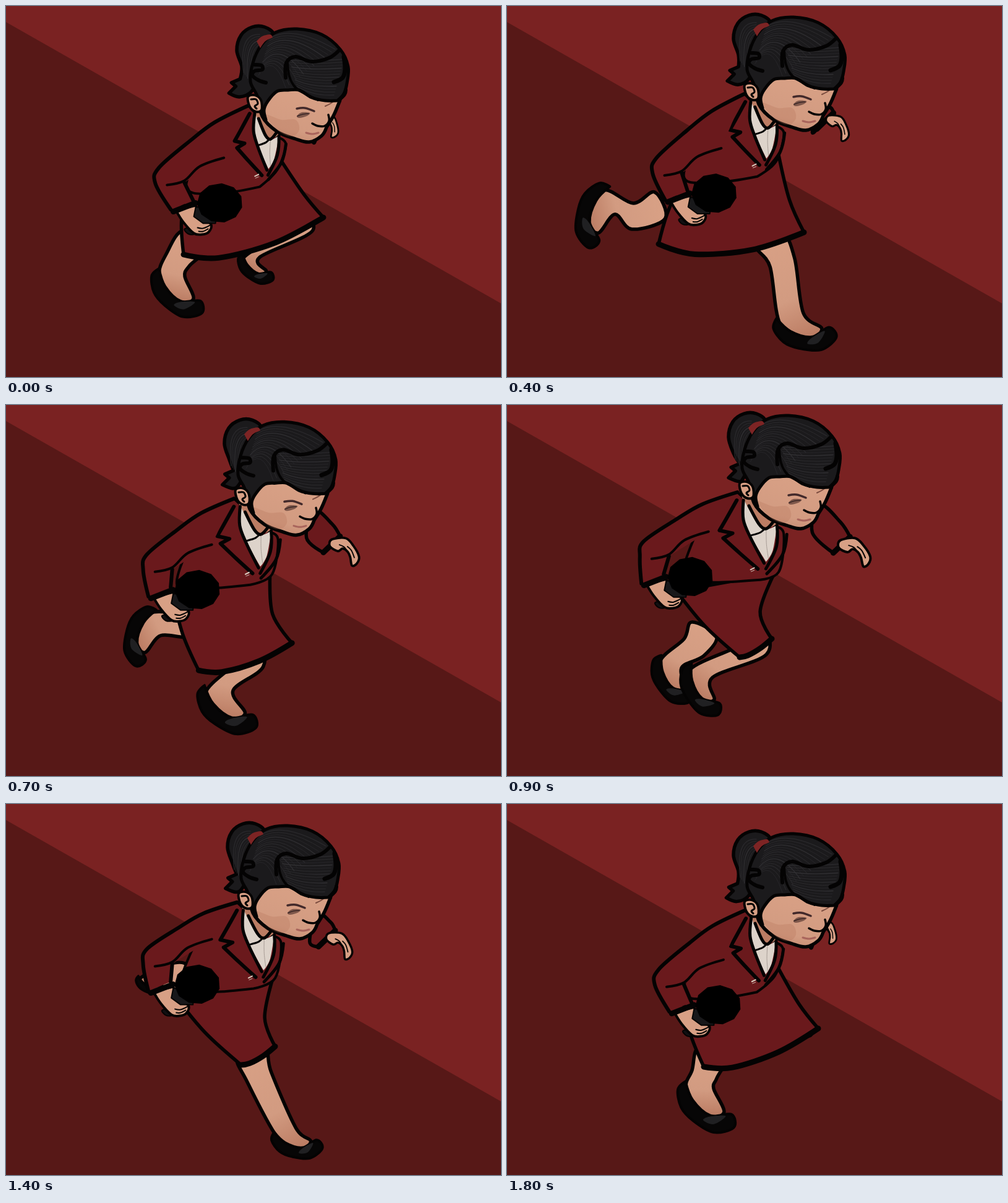
An HTML page with a canvas that plays this animation: 800x600 px, repeating every 1900 ms.

```html
<!DOCTYPE html>
<html lang="en">
<head>
<meta charset="utf-8">
<title>Running reporter</title>
<style>
html, body { margin: 0; width: 100%; height: 100%; overflow: hidden; background: #571817; }
canvas { display: block; width: 800px; height: 600px; }
</style>
</head>
<body>
<canvas id="stage" width="800" height="600"></canvas>
<script>
const ctx = document.getElementById('stage').getContext('2d');
const STEP = 100, COUNT = 19;
const INK = '#040303', CLOTH = '#6a191c', SKIN = '#d8a085', SHADE = '#bb7c63', HAIR = '#1b1a1c';

const pts = s => {
  const n = s.match(/-?[\d.]+/g).map(Number);
  return Array.from({ length: n.length / 2 }, (_, i) => [n[2 * i], n[2 * i + 1]]);
};
const add = ([x, y], dx, dy) => [x + dx, y + dy];
const mix = (a, b, u) => a.map((v, i) => v + (b[i] - v) * u);
const unit = (a, b) => {
  const x = b[0] - a[0], y = b[1] - a[1], l = Math.hypot(x, y) || 1;
  return [x / l, y / l];
};
// One swing per loop, highest at the given step.
const wave = (f, peak) => Math.cos(2 * Math.PI * (f - peak) / COUNT);

// Key joints of the run; everything else hangs on them.
const TIMES = [0, 4, 6, 9, 11, 14, 18];
const joints = {
  body: pts('0,0 -7,-19 -20,-7 -15,-20 -6,-25 -15,-2 -7,11'),
  hemL: pts('287,402 245,385 279,432 376,408 380,402 380,422 318,425'),
  hemR: pts('513,342 480,366 478,385 428,378 437,370 435,392 503,363'),
  nearKnee: pts('278,410 203,340 233,340 400,395 404,425 409,441 319,437'),
  nearHeel: pts('240,435 153,290 205,293 289,425 385,510 432,541 281,460'),
  nearToe: pts('320,492 138,392 163,393 345,498 460,540 512,552 370,518'),
  farKnee: pts('475,362 445,415 435,425 302,392 262,350 262,280 470,370'),
  farHeel: pts('378,408 434,518 354,488 241,412 204,340 212,284 370,385'),
  farToe: pts('433,440 533,530 462,530 297,478 265,428 255,298 410,395')
};

// Periodic cubic interpolation between key positions.
function joint(name, f) {
  const n = TIMES.length, p = joints[name];
  const key = i => {
    const lap = Math.floor(i / n);
    return { t: TIMES[i - lap * n] + lap * COUNT, p: p[i - lap * n] };
  };
  const i = TIMES.findLastIndex(t => t <= f);
  const [a, b, c, d] = [-1, 0, 1, 2].map(o => key(i + o));
  const h = c.t - b.t, u = (f - b.t) / h, v = 1 - u;
  return b.p.map((y0, k) => {
    const y1 = c.p[k];
    const m0 = (y1 - a.p[k]) / (c.t - a.t), m1 = (d.p[k] - y0) / (d.t - b.t);
    return y0 * (1 + 2 * u) * v * v + y1 * u * u * (3 - 2 * u) + h * u * v * (m0 * v - m1 * u);
  });
}

function buildPose(f) {
  const body = joint('body', f);
  const swing = wave(f, 1), twist = (1 - swing) / 2;
  const collar = add(body, 403 - 5 * twist, 174);
  const button = add(collar, 9 + 12 * twist, 97 + 12 * twist);
  return {
    f, body, twist, collar, button,
    collarR: add(collar, 37 + 16 * twist, 37 + 5 * twist),
    pelvis: add(button, -40, 20),
    mic: [320 + 27 * swing, body[1] + 307 + 17 * wave(f, 2.5)],
    reach: wave(f, 9.7)
  };
}

// Smooth curve through the points; corners get no tangent.
function curve(p, closed, corners = []) {
  const n = p.length;
  const tan = i => {
    if (corners.includes(i) || (!closed && (i === 0 || i === n - 1))) return [0, 0];
    const a = p[(i + n - 1) % n], b = p[(i + 1) % n];
    return [(b[0] - a[0]) / 6, (b[1] - a[1]) / 6];
  };
  ctx.beginPath();
  ctx.moveTo(...p[0]);
  for (let i = 0; i < (closed ? n : n - 1); i++) {
    const j = (i + 1) % n, s = tan(i), e = tan(j);
    ctx.bezierCurveTo(p[i][0] + s[0], p[i][1] + s[1], p[j][0] - e[0], p[j][1] - e[1], ...p[j]);
  }
}
function ink(width, color = INK) {
  ctx.lineWidth = width;
  ctx.strokeStyle = color;
  ctx.stroke();
}
function shape(p, fill, width = 5.5, corners) {
  curve(p, true, corners);
  ctx.fillStyle = fill;
  ctx.fill();
  if (width) ink(width);
}
function line(p, width = 4, color, corners) {
  curve(p, false, corners);
  ink(width, color);
}
function fade(a, b) {
  const g = ctx.createLinearGradient(...a, ...b);
  g.addColorStop(0, SKIN);
  g.addColorStop(0.6, '#d29b81');
  g.addColorStop(1, SHADE);
  return g;
}

function drawBackground() {
  ctx.fillStyle = '#7a2222';
  ctx.fillRect(0, 0, 800, 600);
  ctx.fillStyle = '#571817';
  ctx.beginPath();
  pts('0,26 800,481 800,600 0,600').forEach(p => ctx.lineTo(...p));
  ctx.fill();
}

function drawFarArm({ body, collarR, reach }) {
  const hand = add(body, 551 + 27 * reach, 222 + 32 * reach);
  const top = add(collarR, 70, -35), cuffT = add(hand, -8, -20), cuffB = add(hand, -35, 6);
  shape([top, add(mix(top, cuffT, 0.6), 4, -3), cuffT, cuffB, add(collarR, 58, 10)], CLOTH, 5.5, [2, 3]);
  line([cuffT, cuffB], 9);

  ctx.save();
  ctx.translate(...hand);
  ctx.rotate(0.2 * (1 - reach));
  ctx.scale(0.85 + 0.15 * reach, 0.85 + 0.15 * reach);
  shape(pts('-24,-14 0,-18 14,-6 25,12 22,24 14,28 10,14 5,5 -4,0 -12,5 -26,-2'), SKIN, 4);
  line(pts('4,-4 11,2 17,14'), 2);
  line(pts('-10,-6 -2,-3 5,5'), 2);
  ctx.restore();
}

function drawLeg(side, { f, pelvis }) {
  const [knee, heel, toe] = ['Knee', 'Heel', 'Toe'].map(j => joint(side + j, f));
  const [fx, fy] = [toe[0] - heel[0], toe[1] - heel[1]];
  const foot = ([u, v]) => add(heel, u * fx - v * fy, u * fy + v * fx);
  const hip = mix(knee, pelvis, 0.27), ankle = foot([0.25, -0.1]);
  const [a, b] = [unit(hip, knee), unit(knee, ankle)];
  const bend = unit([0, 0], add(a, ...b));
  const across = (p, d, w) => add(p, d[1] * w, -d[0] * w);

  shape([
    across(hip, a, 23), across(knee, bend, 21),
    ...pts('.42,-.27 .75,-.05 .52,.16 .07,-.04').map(foot),
    across(knee, bend, -21), across(hip, a, -23)
  ], fade(hip, foot([0.6, 0.1])));
  shape(pts('0,-.13 -.03,.04 .16,.24 .42,.31 .78,.29 1,.06 .86,-.09 .6,.1 .25,.05').map(foot), '#070606', 4, [0]);
  shape(pts('.8,-.02 .6,.12 .55,.22 .72,.18').map(foot), '#202022', 0);
}

function drawSkirt({ f, button, twist }) {
  const l = joint('hemL', f), r = joint('hemR', f);
  const wl = add(button, -122 - 8 * twist, 22 + 18 * twist);
  const wr = add(button, 34 - 6 * twist, -20 + 32 * twist);
  const sag = 0.09 * (r[0] - l[0]);
  const hem = [l, add(mix(l, r, 0.25), 0, sag), add(mix(l, r, 0.65), 0, sag), r];
  shape([wl, add(mix(wl, l, 0.5), -5, 3), ...hem, add(mix(wr, r, 0.55), -22 * twist, 4), wr],
    CLOTH, 5.5, [0, 2, 5, 7]);
  line(hem, 9);
}

function drawTorso({ collar, collarR, button, twist }) {
  shape([
    add(collar, -11, -13), add(collar, -60, 20), add(button, -121, 19), add(button, -70, 32 - 8 * twist),
    add(button, -2, 21), add(button, 26 + 10 * twist, -7 + 16 * twist), add(collarR, 12, 13), add(collarR, -2, 1)
  ], CLOTH, 4, [0, 4, 7]);

  // Shirt and lapels: down follows the button, across follows the right collar.
  const [ux, uy] = [(collarR[0] - collar[0]) / 37, (collarR[1] - collar[1]) / 37];
  const [vx, vy] = [(button[0] - collar[0]) / 97, (button[1] - collar[1]) / 97];
  const fit = s => pts(s).map(([x, y]) => {
    const d = (y - x) * 97 / 88;
    return add(collar, x * ux + d * vx * 0.92, x * uy + d * vy * 0.92);
  });
  shape(fit('-2,-6 10,34 20,40 37,34 36,14 16,2'), SHADE, 0);
  shape(fit('0,0 -5,26 0,52 14,88 26,72 38,36 21,42 11,31'), '#ddd3ca', 0, [0, 3, 5]);
  line(fit('5,8 14,34 22,41 33,32'), 5);
  line(fit('1,50 14,46 21,40'), 3);
  line(fit('22,44 19,63 18,83'), 1, '#a79c95');
  line(fit('-1,0 -6,28 -1,53 11,90'), 5);
  line(fit('38,36 32,66 12,98'), 5);
  line(fit('-10,0 -30,28 -41,43 -24,47 -38,54 -19,76 1,98'), 6, INK, [2, 3, 4]);
  line(fit('49,49 38,78 12,105'), 5);
  line([add(button, -10, 4), add(button, -4, 1)], 2, '#d8c9bd');
  line([add(button, -9, 7), add(button, -4, 5)], 1, '#d8c9bd');
}

function drawNearArm({ collar, mic, twist }) {
  const neck = add(collar, -11, -13);
  const elbow = add(mic, -105 + 25 * twist, -41);
  const crook = add(elbow, 47, 8), pit = add(elbow, 111, -32);
  const cuff = [add(mic, -79, 11), add(mic, -43, -4)];
  const outer = [neck, add(mix(neck, elbow, 0.36), 0, -15), add(mix(neck, elbow, 0.62), 0, -16),
    add(elbow, 6, -16), add(elbow, 0, 9), cuff[0]];
  shape([...outer, cuff[1], crook, pit], CLOTH, 0, [0, 5, 6, 7, 8]);
  line(outer, 6);
  line([pit, add(mix(pit, crook, 0.55), -4, -8), add(crook, 0, -3), add(crook, -28, 4)], 4);
  line([crook, cuff[1]], 6);

  ctx.save();
  ctx.translate(...mic);
  shape(pts('-57,42 -51,50 -40,50 -42,40'), '#111012', 2);
  shape(pts('-71,12 -59,31 -42,49 -29,51 -18,47 -14,35 -28,23 -39,4'), SKIN, 4, [0, 7]);
  line(pts('-36,40 -27,41 -16,36'), 2);
  line(pts('-34,46 -27,46 -19,42'), 2);
  line(pts('-75,14 -39,0'), 9);
  shape(pts('-39,7 -42,22 -27,33 -7,33 -6,24 -26,6'), '#18181a', 2, [0, 1, 2, 3, 4, 5]);
  ctx.beginPath();
  for (let i = 0; i < 11; i++) {
    const w = (i + 0.4) * 2 * Math.PI / 11;
    ctx.lineTo(37 * Math.cos(w), 32 * Math.sin(w));
  }
  ctx.fillStyle = '#000';
  ctx.fill();
  ctx.restore();
}

function strands(count, start, mid, end) {
  for (let i = 0; i < count; i++) {
    const [a, b, c] = [start, mid, end].map(s => mix(...pts(s), i / (count - 1)));
    ctx.beginPath();
    ctx.moveTo(...a);
    ctx.quadraticCurveTo(...b, ...c);
    ink(i % 3 ? 0.8 : 1.3, i % 2 ? '#302f32' : '#2a292c');
  }
}

function drawHead({ body, twist }) {
  ctx.save();
  ctx.translate(...body);

  // Ponytail, its tip drawn in as the body twists
  const tip = 14 * twist;
  const flick = pts('378,118 364,124 371,130 360,141 377,147').map(p => add(p, tip, -tip / 4));
  shape([...pts('432,46 418,34 398,34 380,47 373,72 381,98'), ...flick, ...pts('397,138 410,110 416,66')],
    HAIR, 5.5, [6, 7, 8, 9]);
  strands(9, '410,46 410,72', '376,44 402,85', '384,108 402,132');

  // Face
  shape(pts('412,150 414,178 438,203 468,215 490,220 510,210 518,196 529,178 538,157 535,140 480,125 430,130'),
    fade([490, 140], [470, 245]), 5.5, [6, 8]);
  shape(pts('420,176 445,184 468,184 474,200 462,211 440,202'), 'rgba(178,112,88,.28)', 0);
  shape(pts('470,178 478,172 491,173 486,178 474,181'), 'rgba(70,42,38,.6)', 0);
  line(pts('470,166 483,165 498,170'), 3.5, '#42292a');
  line(pts('471,178 480,175 489,174'), 1.5, '#3a2626');
  line(pts('516,162 524,158 531,153'), 2, '#7c4d40');
  line(pts('521,176 522,186 515,194 504,194 495,190'), 3.5);
  line(pts('485,205 495,207 505,205'), 3, '#a9655c');

  // Hair
  shape(pts('420,184 414,168 405,143 395,122 399,92 412,64 435,43 470,37 510,46 540,70 553,98 551,125 546,142 536,153 516,153 494,148 474,136 456,136 438,138 423,154 417,168'),
    HAIR, 5, [0, 13]);
  strands(15, '427,52 408,112', '462,30 432,72', '532,70 452,132');
  strands(13, '459,88 470,130', '490,90 497,146', '546,86 530,144');
  line(pts('452,116 453,92 468,82 494,90 522,84 538,72'), 6);
  line(pts('455,92 458,114 468,132 486,143 504,152'), 4);
  line(pts('546,82 548,102 544,116 530,123'), 7);
  line(pts('402,95 413,96 414,103 402,105 398,112 408,120 420,124'), 6);
  line(pts('538,152 547,143 549,136'), 6);
  shape(pts('405,57 414,49 427,46 431,51 419,57 411,68'), '#7d2424', 0, [0, 3, 5]);

  // Ear
  shape(pts('391,147 402,144 412,152 413,168 404,171 394,163'), SKIN, 4);
  line(pts('396,151 404,151 407,158 402,162 405,166'), 3);
  ctx.restore();
}

function draw(f) {
  const pose = buildPose(f);
  drawBackground();
  drawFarArm(pose);
  drawLeg('far', pose);
  drawLeg('near', pose);
  drawSkirt(pose);
  drawTorso(pose);
  drawNearArm(pose);
  drawHead(pose);
}

ctx.lineCap = ctx.lineJoin = 'round';
const start = performance.now();
function tick() {
  draw(Math.floor((performance.now() - start) / STEP) % COUNT);
  requestAnimationFrame(tick);
}
tick();
</script>
</body>
</html>
```
